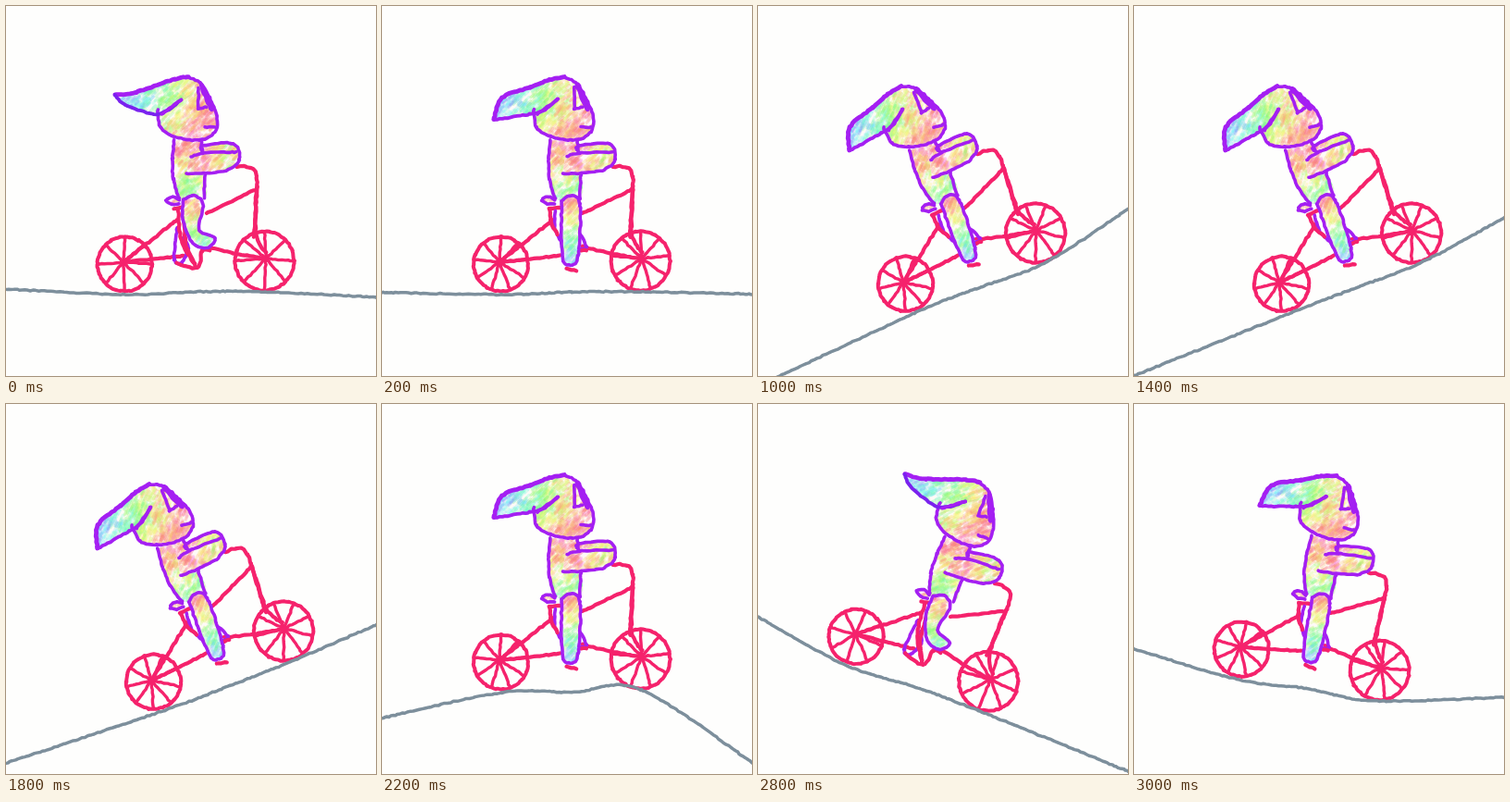
Write an HTML page with a canvas that moves like this. It is 400x400 px and loops after 3.2 s.

```html
<!DOCTYPE html>
<html>
<head>
<meta charset="utf-8">
<style>
html, body { margin: 0; width: 100%; height: 100%; overflow: hidden; background: #fefefd; }
canvas { display: block; width: 400px; height: 400px; }
</style>
</head>
<body>
<canvas id="stage" width="400" height="400"></canvas>
<script>
const ctx = document.getElementById('stage').getContext('2d');
const STEP = 200, COUNT = 16;
const RED = '#f5226c', PURPLE = '#a41ff2', SLATE = '#7d8f9c';

let rnd;
function seed(n) {
  n = n * 7919 + 17;
  rnd = () => (n = n * 16807 % 2147483647) / 2147483647;
}
const spread = d => (rnd() * 2 - 1) * d;
const clamp = (v, a, b) => Math.max(a, Math.min(b, v));

// Smooth curve through the key points, sampled with a shaky hand
function curve(keys, shake = .55) {
  const out = [], at = i => keys[clamp(i, 0, keys.length - 1)];
  for (let i = 0; i < keys.length - 1; i++) {
    const [a, b, c, d] = [at(i - 1), at(i), at(i + 1), at(i + 2)];
    const n = Math.ceil(Math.hypot(c[0] - b[0], c[1] - b[1]) / 3);
    for (let k = 0; k <= n; k++) {
      const t = k / n;
      out.push([0, 1].map(j => spread(shake) + b[j] + .5 * t * (c[j] - a[j] +
        t * (2 * a[j] - 5 * b[j] + 4 * c[j] - d[j] + t * (3 * (b[j] - c[j]) + d[j] - a[j])))));
    }
  }
  return out;
}

function path(p) {
  ctx.beginPath();
  p.forEach(q => ctx.lineTo(...q));
}

function stroke(color, width, keys) {
  path(curve(keys));
  ctx.strokeStyle = color;
  ctx.lineWidth = width;
  ctx.stroke();
}
const red = (...keys) => stroke(RED, 4.2, keys);
const purple = (...keys) => stroke(PURPLE, 3.6, keys);

// Soft pastel dabs inside a shape; hue is a function of place
function crayon(keys, hue) {
  const xs = keys.map(k => k[0]), ys = keys.map(k => k[1]);
  const x0 = Math.min(...xs), y0 = Math.min(...ys);
  const w = Math.max(...xs) - x0, h = Math.max(...ys) - y0;
  ctx.save();
  path(curve(keys, 0));
  ctx.fillStyle = '#fffaf7';
  ctx.fill();
  ctx.clip();
  for (let n = w * h / 22; n > 0; n--) {
    const x = x0 + rnd() * w, y = y0 + rnd() * h;
    ctx.strokeStyle = `hsla(${hue(x, y) + spread(45)},90%,72%,.27)`;
    ctx.lineWidth = 3;
    for (let k = 0; k < 4; k++) {
      const u = x + spread(5), v = y + spread(5);
      path([[u - 1, v + 1], [u + 2, v - 2]]);
      ctx.stroke();
    }
  }
  ctx.restore();
}
const headHue = (x, y) => Math.max(5, 215 - 2.3 * (x - 130) - 1.5 * Math.max(0, y - 105));
const bodyHue = (x, y) => 5 + 2.4 * (y - 152);
const armHue = (x, y) => 35 + 40 * Math.sin(x / 9);
const legHue = (x, y) => 3.2 * (y - 212);

function wheel(x, y, r, hubX, hubY, count) {
  const spot = a => [x + r * Math.cos(a), y + r * Math.sin(a)];
  const turn = Math.PI * 2;
  stroke(RED, 4, Array.from({ length: 19 }, (_, i) => spot(i / 18 * turn)));
  for (let i = 0; i < count; i++) {
    stroke(RED, 3.4, [[hubX, hubY], spot(i / count * turn - turn / 4)]);
  }
}

function bike(up) {
  const spokes = up ? 8 : 9;
  wheel(128.5, 279, 29.5, 127, 277, spokes);
  wheel(279.5, 275.5, 32, 281, 273, spokes);
  red([127, 277], [146, 262], [185, 231]);
  red([128, 277], [192, 270]);
  red([217, 224], [271, 198]);
  red([217, 260], [245, 267], [280, 273]);
  red([250, 174], [260, 174], [271, 184], [270, 245], [281, 266]);
  red([271, 195], [268, 250]);
  red([182, 219], [193, 218]);
}

const head = [[196, 77], [210, 83], [220, 99], [228, 119], [226, 136], [209, 145],
  [182, 141], [167, 131], [164, 112]];
const arm = [[212, 157], [213, 151], [246, 149], [252, 166], [240, 177], [215, 181], [195, 181]];
const torso = [[182, 145], [180, 165], [181, 187], [187, 208]];
const seat = [[187, 210], [180, 206], [173, 210], [179, 214], [187, 214]];

// Each pose: foot, far leg, ear and pedals
function rider(up) {
  const leg = up
    ? [[192, 209], [203, 205], [213, 214], [209, 242], [226, 251], [216, 262], [200, 254], [191, 228], [192, 209]]
    : [[194, 211], [203, 205], [214, 214], [212, 270], [204, 280], [195, 270], [194, 211]];
  const tip = up ? [118, 96] : [121, 123];
  const brow = up ? [[141, 93], [182, 79]] : [[130, 99], [160, 88], [181, 80]];
  const lobe = up ? [[129, 107], [160, 117]] : [[160, 117]];
  const earTop = [tip, ...brow, [197, 77]];
  const earLow = [tip, ...lobe, [176, 112], [190, 101]];

  if (up) {
    purple([185, 240], [182, 274], [190, 277], [197, 262], [192, 250]);
    red([186, 220], [190, 255], [205, 281]);
    red([192, 225], [195, 260], [204, 278]);
    red([184, 278], [207, 283], [212, 265], [220, 264]);
  } else {
    purple([187, 222], [187, 240], [194, 256]);
    purple([212, 243], [221, 260], [215, 263]);
    red([181, 219], [183, 235], [190, 247]);
    red([199, 284], [210, 286]);
    red([213, 264], [221, 264]);
  }

  crayon([...torso, [215, 208], [215, 181], [211, 147]], bodyHue);
  crayon([[198, 163], ...arm], armHue);
  crayon([...head, [180, 104]], headHue);
  crayon([...earTop, [204, 90], ...earLow.slice().reverse()], headHue);
  crayon(leg, legHue);
  crayon(seat, legHue);

  purple(...torso);
  purple([215, 181], [214, 208]);
  purple([211, 146], [212, 156]);
  purple([200, 163], [214, 159], [249, 158]);
  purple(...arm);
  purple(...head);
  purple([208, 88], [208, 111]);
  purple([208, 111], [217, 109]);
  purple([215, 131], [226, 131]);
  stroke(PURPLE, 5, [[211, 86], [222, 112]]);
  stroke(PURPLE, 4.8, earTop);
  stroke(up ? '#7a22ee' : PURPLE, 3.8, earLow);
  purple([168, 117], [190, 101]);
  purple(...seat);
  purple(...leg);
}

// Level road, a climb, a crest, a descent
const tiltAt = i => 10 * (clamp(Math.min(i - 11, 16 - i), 0, 2) - clamp(Math.min(i - 3, 11 - i), 0, 2));

// Road height at both edges: step, left, right
const road = [[0, 306, 315], [2, 313, 308], [3, 313, 258], [4, 349, 240], [5, 412, 218],
  [9, 389, 238], [11, 340, 389], [14, 229, 398], [15, 264, 317]];

function edges(i) {
  const k = Math.max(1, road.findIndex(r => r[0] >= i));
  const [a, b] = [road[k - 1], road[k]], t = (i - a[0]) / (b[0] - a[0]);
  return [1, 2].map(j => a[j] + (b[j] - a[j]) * t);
}

function draw(i) {
  const up = i % 2 === 0, tilt = tiltAt(i), a = tilt * Math.PI / 180;
  const cx = 200 - 1.35 * tilt, cy = 280 - .16 * Math.abs(tilt);
  ctx.lineCap = ctx.lineJoin = 'round';
  ctx.fillStyle = '#fefefd';
  ctx.fillRect(0, 0, 400, 400);

  seed(up ? 3 : 4);
  ctx.save();
  ctx.translate(cx, cy);
  ctx.rotate(a);
  ctx.translate(-200, -280);
  bike(up);
  rider(up);
  ctx.restore();

  // The road touches both wheels and runs out to the edges.
  seed(i + 20);
  const under = (x, y) => [cx + x * Math.cos(a) - y * Math.sin(a), cy + x * Math.sin(a) + y * Math.cos(a)];
  const [left, right] = edges(i);
  stroke(SLATE, 3.5, [[-2, left], under(-71, 32), under(5, 30 + spread(2)), under(80, 29), [402, right]]);
}

const start = performance.now();
let shown = -1;
function tick() {
  const i = Math.floor((performance.now() - start) / STEP) % COUNT;
  if (i !== shown) draw(shown = i);
  requestAnimationFrame(tick);
}
tick();
</script>
</body>
</html>
```
